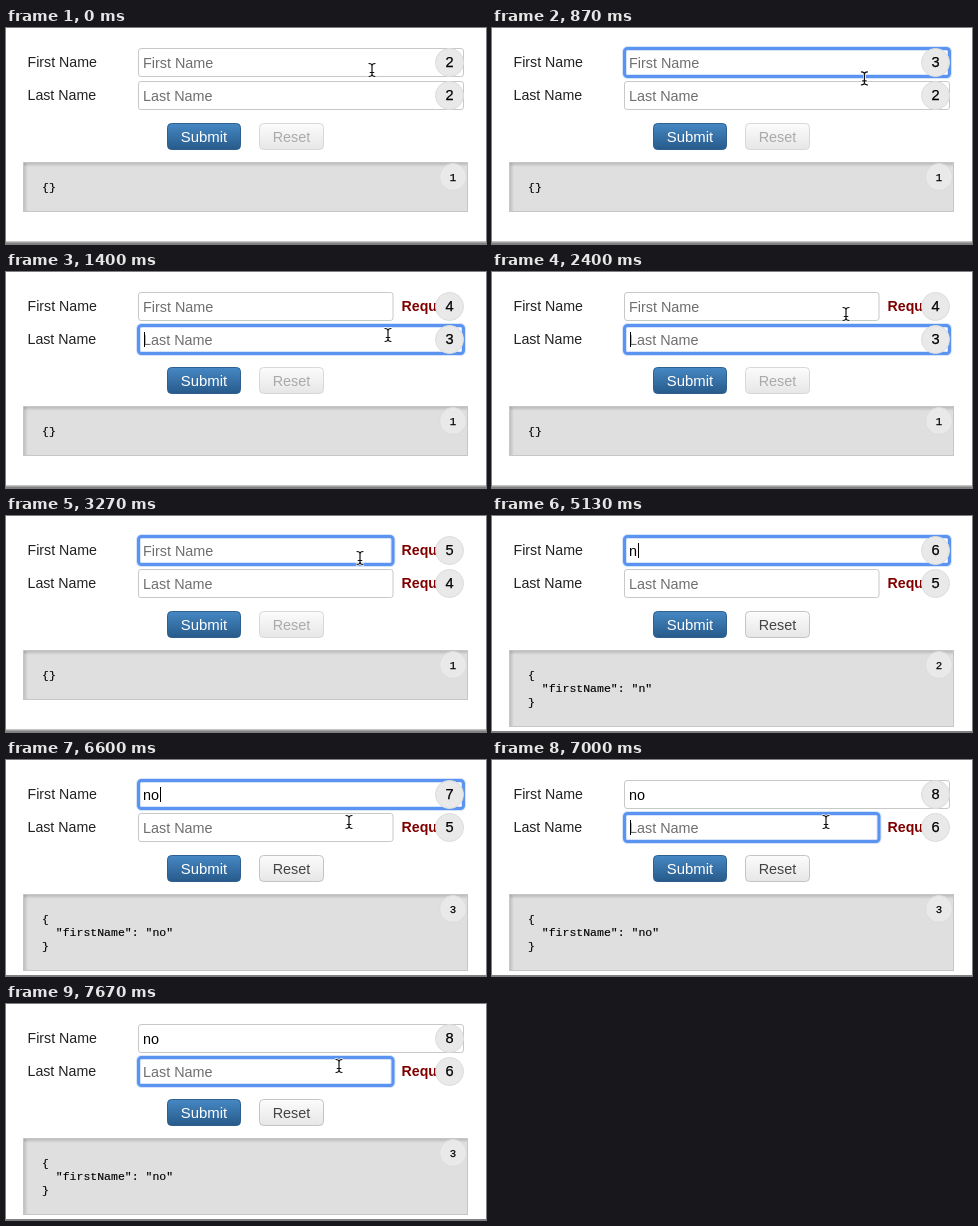
Write an HTML page that moves like this. It is 480 px wide and 216 px high and loops after 8 s.

```html
<!DOCTYPE html>
<html lang="en">
<head>
<meta charset="utf-8">
<title>Form render counts</title>
<style>
  html, body { margin: 0; width: 100%; height: 100%; overflow: hidden; background: #fff; }
  svg { display: block; width: 480px; height: 216px; font: 14.2px "Liberation Sans", Arial, sans-serif; }
  text { white-space: pre; fill: #000; }
  .label { fill: #222; }
  .error { fill: #800000; font-weight: bold; }
  .box { fill: #fff; stroke: #c8c8c8; }
  .ring { fill: none; stroke: #5a94f0; stroke-width: 3; }
  .glow { fill: none; stroke: #5a94f0; stroke-width: 5; opacity: .25; }
  .value { font-size: 14.4px; }
  .badge circle { fill: #e9e9e9; stroke: #dcdcdc; }
  .badge text { font-size: 14.6px; text-anchor: middle; stroke: #000; stroke-width: .25; }
  .mono { font-family: "Liberation Mono", "Courier New", monospace; font-size: 11.5px; stroke: #000; stroke-width: .15; }
  .badge .mono { font-size: 10.7px; }
  .button { font-size: 14.9px; text-anchor: middle; }
</style>
</head>
<body>
<svg viewBox="0 0 480 216">
  <defs>
    <linearGradient id="blue" x2="0" y2="1">
      <stop stop-color="#4688c4"/><stop offset="1" stop-color="#275a8a"/>
    </linearGradient>
    <linearGradient id="grey" x2="0" y2="1">
      <stop stop-color="#fcfcfc"/><stop offset="1" stop-color="#e6e6e6"/>
    </linearGradient>
    <linearGradient id="shade" x2="0" y2="1">
      <stop stop-color="#000" stop-opacity=".16"/><stop offset="1" stop-color="#000" stop-opacity="0"/>
    </linearGradient>
    <linearGradient id="sideShade">
      <stop stop-color="#000" stop-opacity=".14"/><stop offset="1" stop-color="#000" stop-opacity="0"/>
    </linearGradient>
  </defs>

  <g id="fields"></g>

  <rect x="161.5" y="95.5" width="73" height="26" rx="4" fill="url(#blue)" stroke="#2f6090"/>
  <text class="button" x="198" y="113.8" style="fill:#fff">Submit</text>
  <rect id="resetBox" x="253.5" y="95.5" width="64" height="26" rx="4" fill="url(#grey)"/>
  <text id="reset" class="button" x="285.5" y="113.8" style="font-size:14.4px">Reset</text>

  <rect id="panel" x="17.5" y="134.5" width="444" fill="#dfdfdf" stroke="#c6c6c6"/>
  <rect x="18" y="135" width="443" height="4" fill="url(#shade)"/>
  <rect id="side" x="18" y="135" width="4" fill="url(#sideShade)"/>
  <g id="json">
    <text class="mono" x="36" y="163"></text>
    <text class="mono" x="36" y="176.4"></text>
    <text class="mono" x="36" y="189.8"></text>
  </g>
  <g class="badge">
    <circle cx="447" cy="149" r="13.5"/>
    <text id="renders" class="mono" x="447" y="152.5"></text>
  </g>

  <g id="formEdge">
    <rect y="213" width="480" height="1" fill="#c4c4c4"/>
    <rect y="214" width="480" height="1" fill="#a2a2a2"/>
  </g>
  <rect y="215" width="480" height="1" fill="#808080"/>

  <rect id="caret" width="1" height="15"/>
  <g id="cursor" fill="none" stroke-linecap="round">
    <path id="beam" stroke="#fff" stroke-width="2.6"
      d="M-3-6.5Q0-6.5 0-4Q0-6.5 3-6.5M0-4V4M-3 6.5Q0 6.5 0 4Q0 6.5 3 6.5M-1.8 2.5H1.8"/>
    <use href="#beam" id="ink"/>
  </g>
</svg>
<script>
const LOOP = 8000;
const $ = id => document.getElementById(id);
const show = (el, on) => el.setAttribute("visibility", on ? "visible" : "hidden");
const set = (el, attrs) => { for (const k in attrs) el.setAttribute(k, attrs[k]); };

// White halo below, black stroke on top
const ink = $("beam").cloneNode();
ink.removeAttribute("id");
set(ink, { stroke: "#111", "stroke-width": 1.2 });
$("ink").replaceWith(ink);

const fields = ["First Name", "Last Name"].map((name, i) => {
  const g = document.createElementNS("http://www.w3.org/2000/svg", "g");
  g.setAttribute("transform", `translate(0 ${33 * i})`);
  g.innerHTML = `
    <text class="label" x="21.5" y="39">${name}</text>
    <rect class="box" x="132.5" y="20.5" height="28" rx="2.5"/>
    <rect class="glow" x="132.5" y="20.5" height="28" rx="3"/>
    <rect class="ring" x="132.5" y="20.5" height="28" rx="3"/>
    <text class="value" x="137" y="39.8"></text>
    <text class="error" x="395.5" y="39">Required</text>
    <g class="badge"><circle cx="443.5" cy="34.5" r="14"/><text x="443.5" y="39.4"></text></g>`;
  $("fields").append(g);
  const q = s => g.querySelector(s);
  return { name, boxes: g.querySelectorAll("rect"), rings: [q(".glow"), q(".ring")],
           value: q(".value"), error: q(".error"), count: q(".badge text") };
});

// focus: field index or -1; counts: renders of first field, last field, panel
const states = [
  { at: 0,    focus: -1, counts: [2, 2, 1], errors: [0, 0], first: "" },
  { at: 265,  focus: 0,  counts: [3, 2, 1], errors: [0, 0], first: "" },
  { at: 1265, focus: 1,  counts: [4, 3, 1], errors: [1, 0], first: "" },
  { at: 2730, focus: 0,  counts: [5, 4, 1], errors: [1, 1], first: "" },
  { at: 5130, focus: 0,  counts: [6, 5, 2], errors: [0, 1], first: "n" },
  { at: 5265, focus: 0,  counts: [7, 5, 3], errors: [0, 1], first: "no" },
  { at: 6930, focus: 1,  counts: [8, 6, 3], errors: [0, 1], first: "no" }
];
const caretFlips = [265, 730, 1130, 1865, 2400, 3265, 3665, 4200, 4730, 5800, 6265, 6800, 6930, 7465];
const path = [[0, 366, 42], [665, 366, 42], [1130, 382, 63], [1865, 382, 63], [2400, 354, 42],
              [6200, 354, 42], [6600, 343, 62], [6665, 343, 62], [6865, 334, 62],
              [7065, 334, 62], [7130, 333, 62], [LOOP, 333, 62]];

function cursorAt(t) {
  t = Math.floor(t * 0.015 + 0.02) / 0.015; // pointer is sampled 15 times a second
  const i = Math.max(1, path.findIndex(p => p[0] > t));
  const [t0, x0, y0] = path[i - 1], [t1, x1, y1] = path[i];
  const u = Math.min(1, (t - t0) / (t1 - t0)), e = u * u * (3 - 2 * u);
  return [x0 + (x1 - x0) * e, y0 + (y1 - y0) * e];
}

function draw(t) {
  const s = states.filter(k => k.at <= t).pop();
  const filled = s.first !== "";

  fields.forEach((f, i) => {
    const text = i ? "" : s.first;
    f.boxes.forEach(r => r.setAttribute("width", s.errors[i] ? 254.5 : 325));
    f.rings.forEach(r => show(r, s.focus === i));
    f.value.textContent = text || f.name;
    f.value.style.fill = text ? "#000" : "#6f6f6f";
    show(f.error, s.errors[i]);
    f.count.textContent = s.counts[i];
  });

  $("reset").style.fill = filled ? "#444" : "#aaa";
  $("resetBox").setAttribute("stroke", filled ? "#c4c4c4" : "#d8d8d8");

  const height = filled ? 76 : 49;
  $("panel").setAttribute("height", height);
  $("side").setAttribute("height", height - 1);
  const lines = filled ? ["{", `  "firstName": "${s.first}"`, "}"] : ["{}", "", ""];
  lines.forEach((line, i) => $("json").children[i].textContent = line);
  $("renders").textContent = s.counts[2];
  show($("formEdge"), !filled);

  const flips = caretFlips.filter(at => at <= t).length;
  show($("caret"), flips % 2);
  set($("caret"), { x: 138 + (s.focus ? 0 : 8 * s.first.length), y: s.focus === 1 ? 60 : 27 });

  show($("cursor"), t < 3730 || t >= 6265);
  $("cursor").setAttribute("transform", `translate(${cursorAt(t)})`);
}

const start = performance.now();
function tick() {
  draw((performance.now() - start) % LOOP);
  requestAnimationFrame(tick);
}
tick();
</script>
</body>
</html>
```
